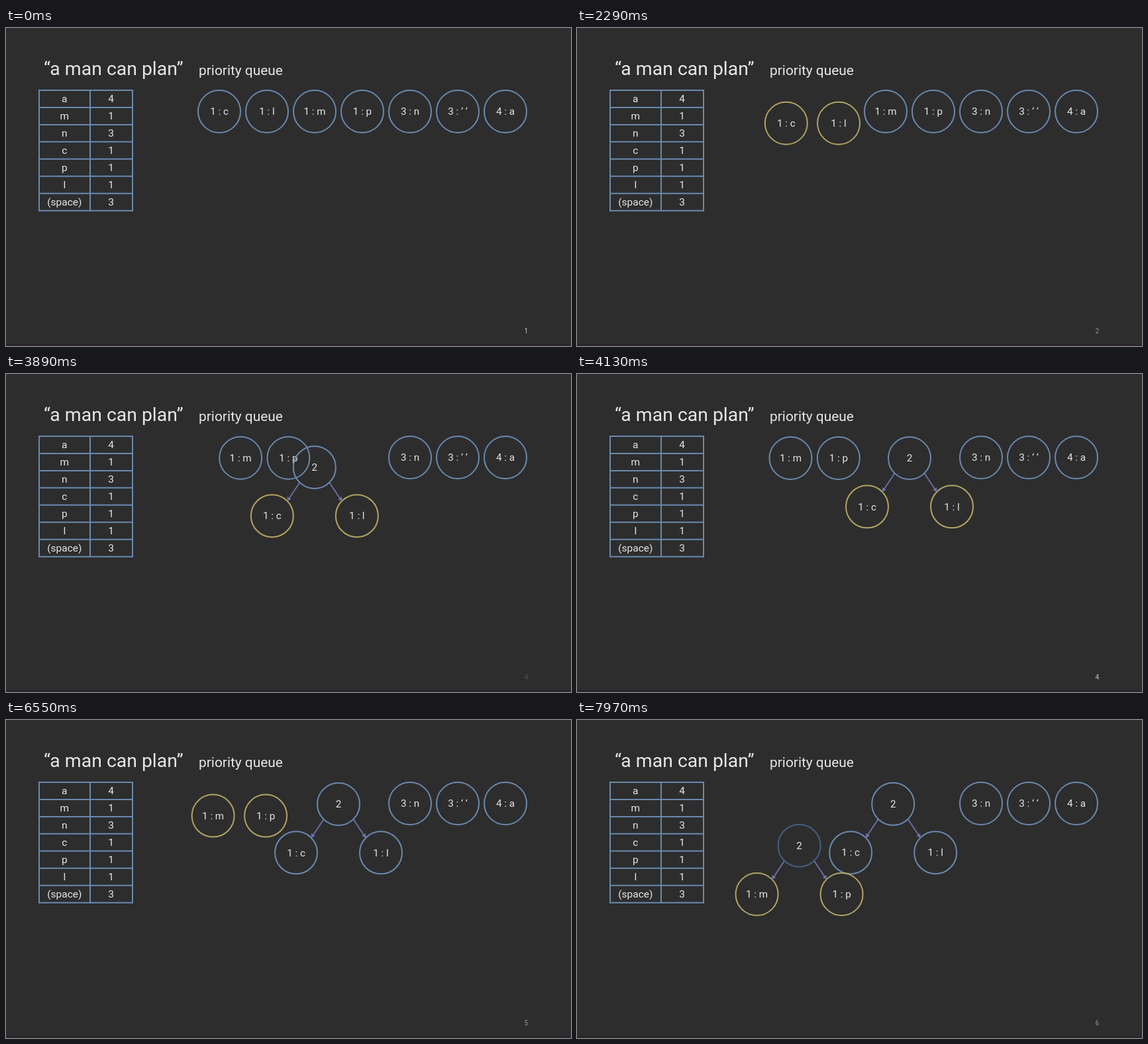
Recreate the animation shown at these times as an HTML page with a canvas. Size 853 by 480 pixels, loop 8 s.

```html
<!DOCTYPE html>
<html lang="en">
<head>
<meta charset="utf-8">
<title>Priority queue</title>
<style>
  html, body { margin: 0; width: 100%; height: 100%; overflow: hidden; background: #2d2d2d; }
  canvas { display: block; }
</style>
</head>
<body>
<canvas id="stage" width="853" height="480"></canvas>
<script>
const ctx = document.getElementById('stage').getContext('2d');
const LOOP = 8000, STEP = 60, RADIUS = 32;
const BLUE = [106, 137, 175], DEEP = [70, 95, 130], GOLD = [178, 164, 98];
const INK = '#e6e6e6', ARROW = '#7170aa';

const labels = {
  c: '1 : c', l: '1 : l', m: '1 : m', p: '1 : p', n: '3 : n',
  s: '3 : ‘ ‘', a: '4 : a', r1: '2', r2: '2'
};
const node = (x, y, color = BLUE) => ({ x, y, color });
const tree = (root, left, right, x, y, leafColor, rootColor = BLUE) => ({
  [root]: node(x, y, rootColor),
  [left]: node(x - 64, y + 73.3, leafColor),
  [right]: node(x + 64, y + 73.3, leafColor)
});
const queue = {};
[...'clmpnsa'].forEach((id, i) => queue[id] = node(322 + 72 * i, 126));

const { c, l, ...rest } = queue;
const { m, p, ...tail } = rest;
const front = color => ({ m: node(322.5, 127, color), p: node(394.8, 127, color) });
const slides = [
  queue,
  { ...queue, c: { ...c, color: GOLD }, l: { ...l, color: GOLD } },
  { ...rest, ...tree('r1', 'c', 'l', 338, 190, GOLD) },
  { ...tail, ...front(BLUE), ...tree('r1', 'c', 'l', 502, 127, GOLD) },
  { ...tail, ...front(GOLD), ...tree('r1', 'c', 'l', 502, 127, BLUE) },
  { ...tail, ...tree('r1', 'c', 'l', 502, 127, BLUE), ...tree('r2', 'm', 'p', 310, 189.7, GOLD, DEEP) },
  { ...tail, ...tree('r1', 'c', 'l', 310, 126, BLUE), ...tree('r2', 'm', 'p', 508, 189.7, GOLD, DEEP) }
];
const morphs = [[870, 8], [2290, 8], [3710, 8], [5130, 7], [6550, 8], [7970, 8]];

const clamp = v => Math.max(0, Math.min(1, v));
const mix = (a, b, t) => a + (b - a) * t;

// Cubic Bezier (.25, .1) (.3, 1), solved by bisection.
function ease(t) {
  if (t <= 0 || t >= 1) return clamp(t);
  const bezier = (a, b, s) => 3 * a * s * (1 - s) ** 2 + 3 * b * s * s * (1 - s) + s ** 3;
  let lo = 0, hi = 1;
  for (let i = 0; i < 24; i++) {
    const mid = (lo + hi) / 2;
    if (bezier(.25, .3, mid) < t) lo = mid; else hi = mid;
  }
  return bezier(.1, 1, lo);
}

function text(str, x, y, size, align = 'center') {
  ctx.font = `${size}px Roboto, "Liberation Sans", sans-serif`;
  ctx.textAlign = align;
  ctx.fillStyle = INK;
  ctx.fillText(str, x, y);
}

function line(x1, y1, x2, y2) {
  ctx.beginPath();
  ctx.moveTo(x1, y1);
  ctx.lineTo(x2, y2);
  ctx.stroke();
}

function drawTable() {
  const rows = [['a', 4], ['m', 1], ['n', 3], ['c', 1], ['p', 1], ['l', 1], ['(space)', 3]];
  ctx.strokeStyle = `rgb(${BLUE})`;
  ctx.lineWidth = 2;
  for (let i = 0; i <= rows.length; i++) line(49, 94 + 25.95 * i, 192, 94 + 25.95 * i);
  for (const x of [50, 127, 191]) line(x, 93, x, 276.5);
  rows.forEach(([key, count], i) => {
    text(key, 88.3, 112 + 26 * i, 15.5);
    text(count, 158.7, 112 + 26 * i, 15.5);
  });
}

function drawArrow(x, y, side) {
  ctx.save();
  ctx.translate(x, y);
  ctx.scale(side, 1);
  ctx.strokeStyle = ctx.fillStyle = ARROW;
  ctx.lineWidth = 1.8;
  line(22.5, 23, 38.5, 47);
  ctx.beginPath();
  ctx.moveTo(41.5, 51.5);
  ctx.lineTo(35.3, 47.8);
  ctx.lineTo(41, 44);
  ctx.fill();
  ctx.restore();
}

function drawNode(id, from, to, t, fadeIn) {
  if (!from && !to) return;
  ctx.globalAlpha = from ? 1 : fadeIn;
  const start = from || to, end = to || from, k = ease(t);
  const x = mix(start.x, end.x, k), y = mix(start.y, end.y, k);
  const color = start.color.map((v, i) => Math.round(mix(v, end.color[i], k)));
  if (id[0] === 'r') [-1, 1].forEach(side => drawArrow(x, y, side));
  ctx.strokeStyle = `rgb(${color})`;
  ctx.lineWidth = 2;
  ctx.beginPath();
  ctx.arc(x, y, RADIUS, 0, 2 * Math.PI);
  ctx.stroke();
  text(labels[id], x, y + 5.3, 15.2);
  ctx.globalAlpha = 1;
}

function drawNumber(value, alpha) {
  ctx.globalAlpha = alpha * .85;
  text(value, 785.2, 461, 10);
  ctx.globalAlpha = 1;
}

function render(time) {
  let index = 0, t = 1;
  morphs.forEach(([start, steps], i) => {
    if (time < start) return;
    index = i + 1;
    t = clamp((Math.floor((time - start) / STEP) + 1) / steps);
  });
  const to = slides[index], from = slides[Math.max(0, index - 1)];
  const fadeOut = clamp(1 - t / .375), fadeIn = clamp((t - .375) / .5);

  ctx.fillStyle = '#2d2d2d';
  ctx.fillRect(0, 0, 853, 480);
  ctx.fillStyle = '#2b2529';
  ctx.fillRect(0, 477, 853, 3);
  text('“a man can plan”', 57, 71, 28.4, 'left');
  text('priority queue', 291, 71, 20.9, 'left');
  drawTable();
  for (const id in labels) drawNode(id, from[id], to[id], t, fadeIn);
  if (index && fadeOut) drawNumber(index, fadeOut);
  drawNumber(index + 1, fadeIn);
}

const origin = performance.now();
function frame() {
  render((performance.now() - origin) % LOOP);
  requestAnimationFrame(frame);
}
frame();
</script>
</body>
</html>
```
